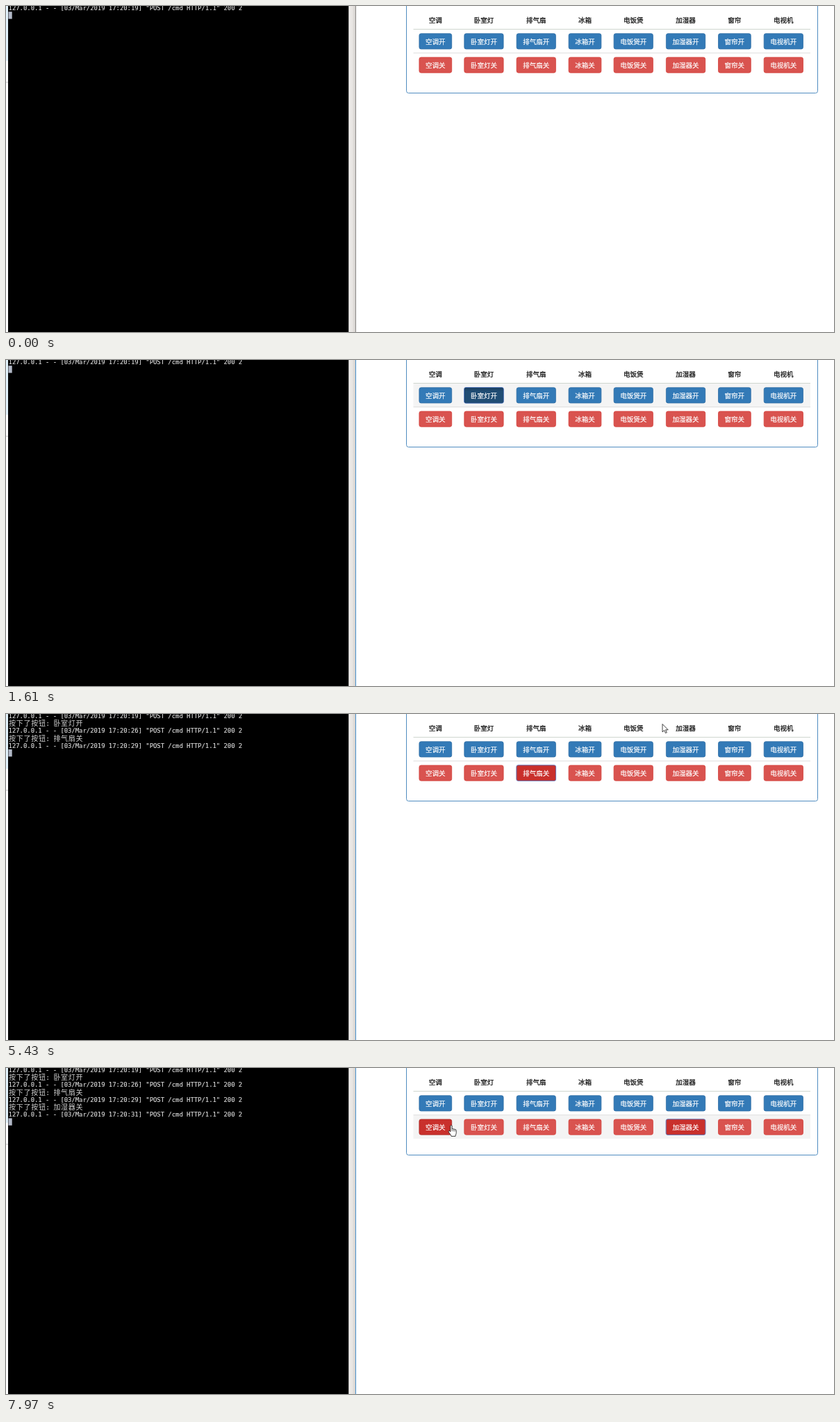
Write an HTML page that moves like this. It is 1192 by 470 pixels and loops after 8 s.

```html
<!DOCTYPE html>
<html lang="zh-CN">
<head>
<meta charset="utf-8">
<title>家电控制面板</title>
<style>
html, body { margin: 0; width: 100%; height: 100%; overflow: hidden; background: #fff; }
svg { display: block; width: 1192px; height: 470px; }
text { font: 9.52px "Noto Sans CJK SC", "Noto Sans CJK", sans-serif; text-anchor: middle; white-space: pre; }
.head { font-weight: 500; fill: #111; stroke: #111; stroke-width: .25px; }
.label { font-weight: 500; fill: #fff; stroke: #fff; stroke-width: .2px; }
.log { font: 8.9px "DejaVu Sans Mono", monospace; text-anchor: start; fill: #e2e2e2; stroke: #e2e2e2; stroke-width: .12px; }
.press { font: 10px "Noto Sans CJK SC", "Noto Sans CJK", monospace; text-anchor: start; fill: #d0d0d0; letter-spacing: .72px; }
</style>
</head>
<body>
<svg id="stage" viewBox="0 0 1192 470">
  <defs>
    <linearGradient id="bar">
      <stop offset="0" stop-color="#f1efed"/>
      <stop offset=".6" stop-color="#e6e3e0"/>
      <stop offset="1" stop-color="#d2cfcc"/>
    </linearGradient>
    <linearGradient id="inset" x2="0" y2="1">
      <stop offset="0" stop-opacity=".16"/>
      <stop offset=".25" stop-opacity="0"/>
    </linearGradient>
  </defs>
</svg>
<script>
const LOOP = 8000;
const svg = document.getElementById('stage');

function add(tag, attrs, parent = svg) {
  const el = document.createElementNS('http://www.w3.org/2000/svg', tag);
  for (const k in attrs) el.setAttribute(k, attrs[k]);
  return parent.appendChild(el);
}
const box = (x, y, width, height, fill, more) => add('rect', { x, y, width, height, fill, ...more });
function write(x, y, cls, str, parent) {
  const el = add('text', { x, y, class: cls }, parent);
  el.textContent = str;
  return el;
}
const show = (el, on) => el.setAttribute('visibility', on ? 'visible' : 'hidden');
const within = (t, [a, b]) => t >= a && t < b;

// Terminal
box(0, 0, 3, 79, '#e2f2fb');
box(0, 109.5, 3, 1, '#c8c8c8');
box(3, 0, 490.5, 470, '#000');
box(493.5, 0, 9.5, 470, 'url(#bar)');
const edge = box(503, 0, 1, 470, '#8c8a88');
const PITCH = 10.7;
const request = (line, sec) =>
  [write(3.6, 5.9 + PITCH * line, 'log', `127.0.0.1 - - [03/Mar/2019 17:20:${sec}] "POST /cmd HTTP/1.1" 200 2`)];
request(0, 19);
const logs = [[2620, '卧室灯开', 26], [5100, '排气扇关', 29], [7220, '加湿器关', 31]].map(([at, name, sec], i) => {
  const y = 6.6 + PITCH * (2 * i + 1);
  const parts = [
    write(4, y, 'press', '按下了按钮'),
    write(57.6, y, 'log', ':'),
    write(68.4, y, 'press', name),
    ...request(2 * i + 2, sec)
  ];
  return { at, parts };
});
const caret = box(3.5, 8.2, 5.2, 10.4, '#b3b9c8');

// Control panel
add('path', {
  d: 'M576.5 -5V122.5a3 3 0 0 0 3 3H1165.5a3 3 0 0 0 3 -3V-5',
  fill: 'none', stroke: '#4f8cc0'
});
const rows = [box(586.5, 34, 571.5, 33.7, '#f4f4f4'), box(586.5, 68.2, 571.5, 33.7, '#f4f4f4')];
box(586.5, 33, 571.5, 1, '#cfd6cf');
box(586.5, 67.3, 571.5, 1, '#dcdcdc');

const names = ['空调', '卧室灯', '排气扇', '冰箱', '电饭煲', '加湿器', '窗帘', '电视机'];
const lefts = [594.5, 659.4, 734.7, 809.7, 874.7, 950, 1025.1, 1090.8];
// [fill, border] for idle, lit and pressed
const looks = [
  [['#337ab7', '#2e6da4'], ['#286090', '#204d74'], ['#204d74', '#122b40']],
  [['#d9534f', '#d43f3a'], ['#c9302c', '#ac2925'], ['#ac2925', '#761c19']]
];
const H = 23;
const buttons = [];
names.forEach((name, i) => {
  const w = (name.length + 1) * 9.52 + 19;
  const mid = lefts[i] + w / 2;
  write(mid, 24.3, 'head', name);
  ['开', '关'].forEach((act, row) => {
    const x = lefts[i], y = 39.4 + row * 34.2;
    const face = box(x + .4, y + .4, w - .8, H - .8, '', { rx: 2.6, 'stroke-width': .8 });
    const shade = box(x + .8, y + .8, w - 1.6, H - 1.6, 'url(#inset)', { rx: 2 });
    const ring = box(x + .2, y + .2, w - .4, H - .4, 'none', { rx: 2, stroke: '#5580d2', 'stroke-width': .8 });
    write(mid, y + 15.1, 'label', name + act);
    buttons.push({ id: name + act, x, y, w, row, face, shade, ring });
  });
});

// Pointer
const spot = add('circle', { r: 10, fill: '#ffe800', opacity: .62 });
const pointer = add('g', { 'stroke-linejoin': 'round' });
const arrow = add('path', {
  d: 'M0 0V11.4L2.7 9L4.5 13L6.3 12.2L4.6 8.3H8.2Z',
  fill: '#fff', stroke: '#111', 'stroke-width': .8
}, pointer);
const hand = add('g', {}, pointer);
add('path', {
  d: 'M-1.2 9V.6C-1.2 -.7 1.1 -.7 1.1 .6V5C1.5 4.2 3 4.4 3.2 5.3C3.8 4.6 5 5 5.2 5.9C6 5.3 7.2 5.8 7.2 7V10.6C7.2 12.4 6 13.2 6 15.4H0C-.3 13.4 -2.4 11.6 -3.7 9.2C-4.4 7.8 -2.8 6.8 -1.9 8Z',
  fill: '#fff', stroke: '#111', 'stroke-width': .8
}, hand);
add('path', { d: 'M1.1 5V8.2M3.2 5.4V8.4M5.2 6V8.6', stroke: '#111', 'stroke-width': .6 }, hand);

// Curved moves in even steps; each holds its end point until it is hidden
const moves = [
  { from: 70, to: 840, n: 10, hide: 1310, p: [1130, 451, 860, 100, 665, 43], ease: u => 1 - (1 - u) ** 1.6 },
  { from: 1310, to: 1535, n: 3, hide: 1610, p: [680, 55, 800, 82, 929, 13] },
  { from: 2940, to: 3410, n: 6, hide: 3790, p: [826, 19, 783, 85.5, 762, 82] },
  { from: 3790, to: 4015, n: 3, hide: 4090, p: [790, 72, 880, 40, 923, 7] },
  { from: 5430, to: 5890, n: 6, hide: 6340, p: [945, 14.5, 955, 70, 974, 89] },
  { from: 6340, to: 6420, n: 1, hide: 6420, p: [982, 67, 982, 67, 982, 67] },
  { from: 7580, to: 7970, n: 5, hide: LOOP, p: [789, 17, 690, 60, 641, 83] }
];
const clicks = [
  { id: '卧室灯开', row: 0, busy: [1080, 2400], glow: [930, 1160] },
  { id: '排气扇关', row: 1, busy: [3560, 4800], glow: [3490, 3630] },
  { id: '加湿器关', row: 1, busy: [6040, 7050], glow: [5970, 6120] }
];
const FOCUS = 930;

function pointerAt(t) {
  const m = moves.find(m => within(t, [m.from, m.hide]));
  if (!m) return null;
  const step = Math.floor((t - m.from) / (m.to - m.from) * m.n + 1e-6);
  let u = Math.min(1, step / m.n);
  if (m.ease) u = m.ease(u);
  const v = 1 - u;
  const mix = k => v * v * m.p[k] + 2 * u * v * m.p[k + 2] + u * u * m.p[k + 4];
  return { x: mix(0), y: mix(1) };
}

function draw(t) {
  const pos = pointerAt(t);
  const busy = clicks.find(c => within(t, c.busy));
  const last = clicks.filter(c => t >= c.busy[0]).pop();
  const focus = last ? last.id : t >= FOCUS ? '窗帘关' : '';

  // While a request is pending the page keeps its hover state
  const over = pos && !busy && buttons.find(b =>
    pos.x >= b.x && pos.x <= b.x + b.w && pos.y >= b.y && pos.y <= b.y + H);
  let hoverRow = -1;
  if (busy) hoverRow = busy.row;
  else if (pos && pos.x > 586 && pos.x < 1158 && pos.y > 33.5 && pos.y < 102) hoverRow = pos.y < 67.8 ? 0 : 1;
  rows.forEach((r, i) => show(r, i === hoverRow));

  for (const b of buttons) {
    const pressed = !!busy && busy.id === b.id;
    const lit = b === over || b.id === focus;
    const [fill, stroke] = looks[b.row][pressed ? 2 : lit ? 1 : 0];
    b.face.setAttribute('fill', fill);
    b.face.setAttribute('stroke', stroke);
    show(b.shade, pressed);
    show(b.ring, b.id === focus);
  }

  edge.setAttribute('fill', t >= FOCUS ? '#4a93cf' : '#8c8a88');
  let done = 0;
  for (const l of logs) {
    const on = t >= l.at;
    if (on) done++;
    l.parts.forEach(p => show(p, on));
  }
  caret.setAttribute('y', 8.2 + 2 * PITCH * done);

  const glow = pos && clicks.some(c => within(t, c.glow));
  show(spot, glow);
  show(arrow, pos && !over && !busy);
  show(hand, pos && (over || busy));
  if (pos) {
    pointer.setAttribute('transform', `translate(${pos.x} ${pos.y})`);
    spot.setAttribute('cx', pos.x);
    spot.setAttribute('cy', pos.y + .8);
  }
}

function tick() {
  draw(performance.now() % LOOP);
  requestAnimationFrame(tick);
}
tick();
</script>
</body>
</html>
```
